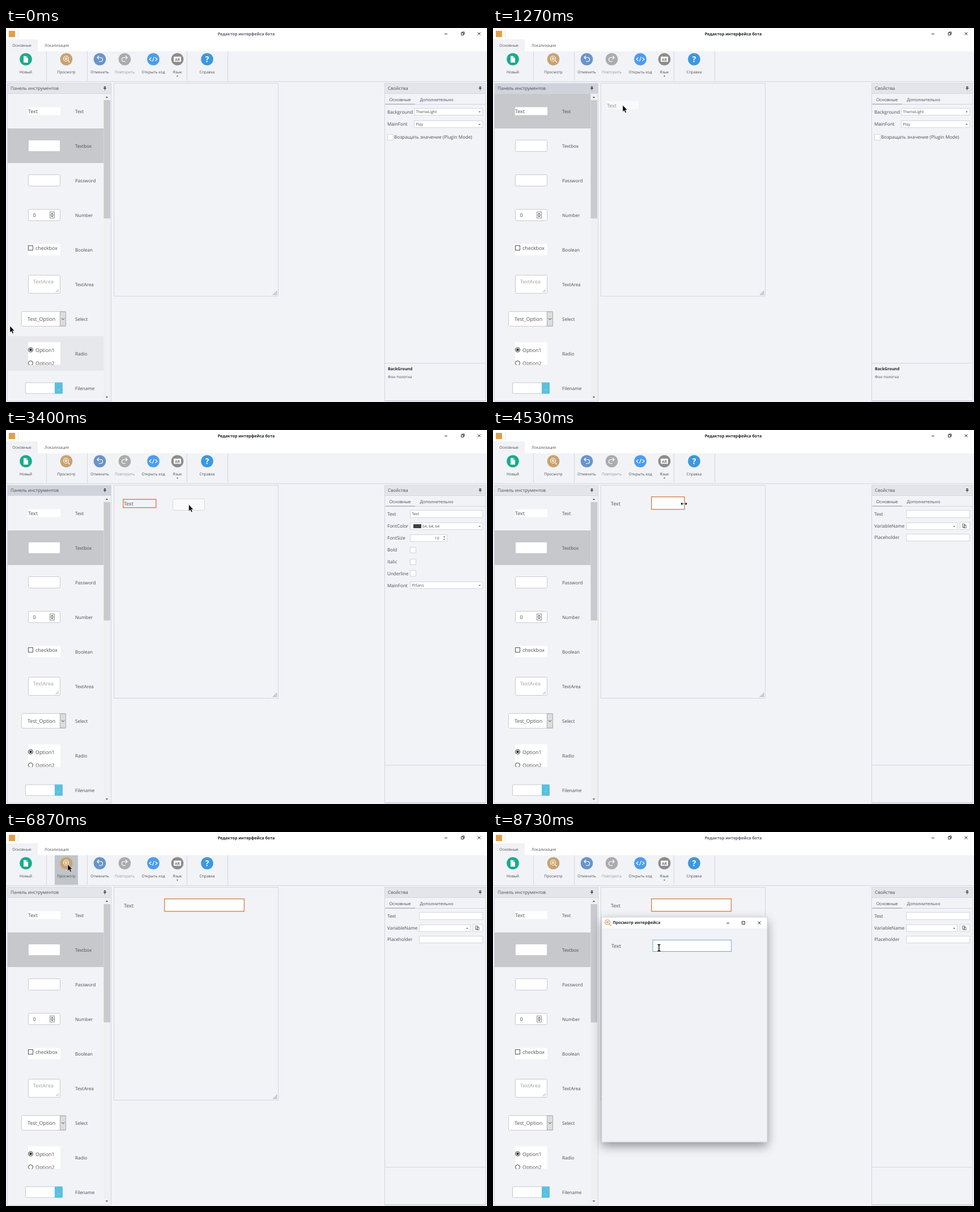
Recreate the animation shown at these times as an HTML page. Size 849 px wide and 659 px high, loop 9140 ms.

```html
<!DOCTYPE html>
<html lang="ru">
<head>
<meta charset="utf-8">
<title>Редактор интерфейса бота</title>
<style>
html, body { margin: 0; width: 100%; height: 100%; overflow: hidden; background: #f1f3f7; }
svg { display: block; width: 849px; height: 659px; }
text { font: 8.1px "Open Sans", "Noto Sans", sans-serif; fill: #4a4c52; text-rendering: geometricPrecision; white-space: pre; }
.s { font-size: 6.7px; }
.tab { font-size: 7.6px; }
.p { font-size: 8.9px; fill: #505050; }
.b { font-size: 7.1px; font-weight: 700; fill: #20242c; }
.c { text-anchor: middle; }
.box { fill: #fff; stroke: #d3d6de; }
.prev { fill: #fff; stroke: #c9cacd; }
.line { fill: none; stroke: #d3d6df; }
.ink { fill: none; stroke: #333; }
.w { fill: none; stroke: #fff; stroke-width: 1.2; }
</style>
</head>
<body>
<svg id="stage" viewBox="0 0 849 659"></svg>
<script>
const LOOP = 9140, TICK = 1000 / 15;

// Markup helpers
const rect = (x, y, w, h, a = '') => `<rect x="${x}" y="${y}" width="${w}" height="${h}" ${a}/>`;
const text = (x, y, s, c = '', a = '') => `<text x="${x}" y="${y}" class="${c}" ${a}>${s}</text>`;
const path = (d, a = 'class="ink"') => `<path d="${d}" ${a}/>`;
const group = (id, body, a = '') => `<g id="${id}" ${a}>${body}</g>`;
const box = (x, y, w, h, c = 'box') => rect(x + .5, y + .5, w - 1, h - 1, `class="${c}"`);
const tri = (x, y, r, up) => path(`M${x - r} ${y}h${2 * r}l${-r} ${up ? -r : r}z`, 'fill="#444"');
const combo = (x, y, w, s = '') => box(x, y, w, 13) + text(x + 3.5, y + 9, s, 's') + tri(x + w - 6, y + 6, 1.8);
const check = y => box(713, y, 11, 11);
const labels = list => list.map(([y, s]) => text(673, y, s)).join('');
const pin = x => path(`M${x - 1.5} 103.5h3M${x - 1} 103.5v3M${x + 1} 103.5v3M${x - 2.5} 106.5h5M${x} 106.5v3`);
const lens = (x, y, k) => `<g transform="translate(${x} ${y}) scale(${k})">` +
  '<circle cx="-.5" cy="-.5" r="4.5"/><circle cx="-.5" cy="-.5" r="1.6"/><path d="M2.8 2.8L6 6"/></g>';
const grip = (x, y) => {
  let d = '';
  for (let i = 0; i < 4; i++)
    for (let j = 0; j <= i; j++) d += `M${x - 2 * j} ${y - 6 + 2 * i}h1.2v1.2h-1.2z`;
  return path(d, 'fill="#8b8e94"');
};

const tools = [
  { x: 35, name: 'Новый', color: '#1aab8b', hit: [14, 56], icon: path('M31 49.500h5l3 3v8.500h-8z', 'fill="#fff"') + path('M36 49.500v3h3', 'fill="none" stroke="#1aab8b" stroke-width=".8"') },
  { x: 106.500, name: 'Просмотр', color: '#c8a370', hit: [86, 127], icon: `<g class="w">${lens(106.5, 54.5, 1)}</g>` },
  { x: 165.500, name: 'Отменить', color: '#6994ca', hit: [145, 186], icon: path('M164 49l-3 3 3 3M161 52h6a3.500 3.500 0 0 1 0 7h-3', 'class="w"') },
  { x: 209.500, name: 'Повторить', color: '#acacac', icon: path('M211 49l3 3-3 3M214 52h-6a3.500 3.500 0 0 0 0 7h3', 'class="w"') },
  { x: 260, name: 'Открыть код', color: '#4a9cf0', hit: [233, 287], icon: path('M256.500 52l-3.500 3 3.500 3M263.500 52l3.500 3-3.500 3M261.500 51l-3 8', 'class="w"') },
  { x: 302.500, name: 'Язык', color: '#8f8b8b', hit: [288, 318], icon: rect(296, 50.5, 13, 9, 'rx="1" fill="#fff"') + text(302.5, 57.5, 'AЯ', 'c', 'style="font-size:6.5px;font-weight:600"') },
  { x: 355, name: 'Справка', color: '#3c98de', hit: [334, 376], icon: text(355, 60, '?', 'c', 'style="font-size:14px;font-weight:700;fill:#fff"') }
];

const rowY = i => 116 + 61 * i;
const field = y => rect(39.5, y - 10, 56, 20, 'rx="2" class="prev"');
const rows = [
  ['Text', y => rect(39, y - 7, 57, 14, 'fill="#fff"') + text(39, y + 3.5, 'Text', 'p')],
  ['Textbox', field],
  ['Password', field],
  ['Number', y => field(y) + text(47.5, y + 3.5, '0', 'p') + rect(77.5, y - 5.5, 8, 11, 'fill="#eee" stroke="#999"') +
    path(`M77.500 ${y}h8`, 'stroke="#999"') + tri(81.5, y - 1.5, 2, true) + tri(81.5, y + 1.5, 2)],
  ['Boolean', y => rect(39, y - 10, 57, 20, 'fill="#fff"') + rect(39.5, y - 7, 8, 8, 'fill="#fff" stroke="#555"') + text(52, y, 'checkbox', 'p')],
  ['TextArea', y => rect(39.5, y - 16, 56, 32, 'rx="2" class="prev"') + text(48, y - 2, 'TextArea', 'p', 'style="fill:#a0a0a0"') +
    path(`M88 ${y + 14}l5-5M91 ${y + 14}l2-2`, 'stroke="#999"')],
  ['Select', y => rect(27.5, y - 13, 78, 26, 'rx="2" class="prev"') + `<svg x="38" y="${y - 12}" width="50" height="24">${text(0, 15.5, 'Test_Option', 'p')}</svg>` +
    rect(95.5, y - 12.5, 10, 25, 'fill="#ddd" stroke="#aaa"') + path(`M98 ${y - 1}l2.500 2.500 2.500-2.500`)],
  ['Radio', y => `<svg x="39" y="${y - 20}" width="57" height="40">` + rect(0, 0, 57, 40, 'fill="#fff"') +
    '<circle cx="4.500" cy="13.500" r="4" class="ink"/><circle cx="4.500" cy="13.500" r="2.200" fill="#222"/><circle cx="4.500" cy="37" r="4" class="ink"/>' +
    text(13, 17, 'Option1', 'p') + text(13, 40, 'Option2', 'p') + '</svg>'],
  ['Filename', y => rect(34.5, y - 9.5, 53, 19, 'rx="1" class="prev"') + rect(86, y - 10, 14, 20, 'rx="1" fill="#5bc0de"') + text(93, y + 3, '..', 'c', 'style="fill:#fff"')]
];

const frame = rect(0, 0, 849, 659, 'fill="#f1f3f7"') + rect(0, 0, 849, 41, 'fill="#fff"') + rect(0, 20, 56, 21, 'fill="#f1f2f6"') +
  rect(5, 5, 11, 11, 'fill="#e0a04c"') + path('M21.500 3v15', 'stroke="#ece5da"') +
  text(424, 12.5, 'Редактор интерфейса бота', 'b c', 'id="title"') +
  path('M774 10.500h5M803.500 8.500h4v4h-4zM805 8.500v-1.500h4v4h-1.500M832.500 7.500l5 5m0-5l-5 5') +
  text(28, 32.5, 'Основные', 's c') + text(89.5, 32.5, 'Локализация', 's c') +
  path('M71.500 41v52M143.500 41v52M319.500 41v52M391.500 41v52M0 94.500h849', 'class="line"');

const ribbon = rect(0, 41, 0, 52, 'id="hot"') + tools.map(t => `<circle cx="${t.x}" cy="55" r="10.800" fill="${t.color}"/>` + t.icon +
  text(t.x, 79.5, t.name, 's c', t.hit ? '' : 'style="fill:#92959b"')).join('') + tri(302.5, 84, 1.7);

const toolbox = box(2, 97, 184, 561, 'line') + rect(3, 98, 182, 17.5, 'id="head"') + path('M3 115.500h182', 'class="line"') +
  text(8, 109, 'Панель инструментов', '', 'style="font-size:7.900px"') + pin(174.5) +
  '<svg width="186" height="656">' + rect(2.5, 0, 170, 61, 'id="hover" fill="#e7e8eb"') + rect(2.5, 0, 170, 61, 'id="picked" fill="#c7c8cc"') +
  rows.map(([name, draw], i) => draw(rowY(i) + 30.5) + text(122, rowY(i) + 33.5, name)).join('') + '</svg>' +
  rect(172.5, 116, 12, 540, 'fill="#f0f0f2"') + rect(172.5, 127, 11.5, 208.5, 'fill="#c9cacd"') + tri(178, 123, 2.3, true) + tri(178, 649.5, 2.3);

const canvas = box(190, 97, 291, 376, 'line') + grip(477, 469) +
  group('label', rect(206.75, 122.25, 58, 14.5, 'id="ring" fill="none" stroke="#ee7a58" stroke-width="1.500"') + text(208, 132.5, 'Text', 'p')) +
  rect(279.75, 117.75, 58, 22, 'id="input" fill="#fff" stroke="#dc8a58" stroke-width="1.500"');

const props = box(668, 97, 179, 561, 'line') + rect(669, 98, 177, 17.5, 'fill="#e4e5ea"') + text(674, 109, 'Свойства', '', 'style="font-size:7.900px"') + pin(837) +
  path('M669 115.500h177M669 134.500h177', 'class="line"') + path('M670 134.200h52', 'stroke="#aeb1bb" stroke-width="1.500"') +
  text(695.5, 129, 'Основные', 'tab c') + text(760, 129, 'Дополнительно', 'tab c') + box(668, 590, 179, 67, 'line') +
  group('panel0', labels([[151, 'Background'], [172, 'MainFont']]) + combo(720, 141, 122, 'ThemeLight') + combo(720, 163, 122, 'Play') +
    box(673, 187, 11, 11) + text(685, 195.3, 'Возращать значение (Plugin Mode)') + text(674, 603, 'BackGround', 'b') + text(674, 616.5, 'Фон полотна', 's')) +
  group('panel1', labels([[151, 'Text'], [172, 'FontColor'], [193, 'FontSize'], [214, 'Bold'], [235, 'Italic'], [255.5, 'Underline'], [276.5, 'MainFont']]) +
    box(713, 141, 129, 14) + text(716.5, 150.2, 'Text', 's') + combo(713, 163, 129) + rect(719, 166, 14, 7, 'fill="#404040"') + text(735, 172, '64; 64; 64', 's') +
    box(713, 184, 66, 13) + text(764.5, 193, '10', 's', 'text-anchor="end"') + tri(773.5, 189, 1.8, true) + tri(773.5, 192, 1.8) +
    check(206) + check(227) + check(247) + combo(713, 267, 129, 'PtSans')) +
  group('panel2', labels([[151, 'Text'], [172, 'VariableName'], [192, 'Placeholder']]) + box(729, 141, 113, 14) + combo(729, 163, 91) +
    box(824, 162, 18, 14) + path('M828.500 165.500h4v6h-4zM831 167.500h4v5h-4z', 'fill="#fff" stroke="#555" stroke-width=".8"') + box(729, 183, 113, 13));

const ghosts = group('ghostText', rect(-28, -7, 56, 14, 'fill="#fff"') + text(-28, 3.5, 'Text', 'p'), 'opacity=".65"') +
  group('ghostBox', rect(-28, -10, 56, 20, 'rx="2" class="prev"'), 'opacity=".65"');

const preview = group('preview', rect(192, 150, 292, 396.5, 'fill="#f1f2f6" style="filter:drop-shadow(0 7px 9px #0006)"') +
  rect(192, 150, 292, 19.5, 'fill="#fff"') + box(191.5, 149.5, 293, 397, 'line') + `<g fill="none" stroke="#c29353" stroke-width="1.200">${lens(202.5, 159.5, .95)}</g>` +
  text(211.5, 162.3, 'Просмотр интерфейса', 'b') + path('M412 160.500h5M439.500 157.500h5v5h-5zM467.500 157.500l5 5m0-5l-5 5') +
  text(209, 204.3, 'Text', 'p') + rect(282, 190.3, 138.7, 20.2, 'id="entry" fill="#fff"') + path('M291 194v12', 'id="caret" stroke="#333"'));

const pointers = group('arrow', path('M0 0V11.500L2.600 9.200 4.500 13.400 6.400 12.500 4.600 8.500H8Z', 'fill="#000" stroke="#fff" stroke-width=".5"')) +
  group('sizer', path('M-6 0l3.200-2.700v2h5.600v-2L6 0 2.800 2.700v-2h-5.600v2z', 'fill="#000" stroke="#fff" stroke-width=".4"') + path('M0-2.500v5', 'stroke="#fff"')) +
  group('beam', path('M-2.500-5.500h2l.5.500.5-.5h2M0-5v10M-2.500 5.500h2l.5-.5.5.5h2', 'fill="none" stroke="#000" stroke-width="1.400"'));

document.getElementById('stage').innerHTML = frame + ribbon + toolbox + canvas + props + preview + ghosts + pointers;

const el = id => document.getElementById(id);
const show = (id, on) => el(id).style.display = on ? '' : 'none';
const set = (id, name, value) => el(id).setAttribute(name, value);

const linear = k => k;
const out = k => k * (2 - k);
const smooth = k => k * k * (3 - 2 * k);

// Pointer path: time, x, y, easing towards the point
const moves = [
  [-67, 12, 560], [0, 7, 525, linear], [600, 67, 144, out],
  [730, 67, 144, linear], [1270, 229, 136, smooth], [1400, 235, 129, out],
  [1600, 235, 129, linear], [2670, 69, 208, smooth],
  [2730, 69, 208, linear], [3270, 326, 132, smooth], [3730, 309, 129, smooth],
  [4070, 309, 129, linear], [4330, 336, 130, smooth], [4530, 337, 130, linear],
  [4800, 337, 130, linear], [5470, 420, 130, smooth], [5730, 416, 136, smooth],
  [6070, 234, 85, linear], [6670, 109, 57, out],
  [7070, 109, 57, linear], [7930, 292, 201, smooth], [8070, 293, 204, linear], [LOOP, 293, 204, linear]
];

function pointer(t) {
  const i = Math.max(1, moves.findIndex(m => m[0] >= t));
  const [t0, x0, y0] = moves[i - 1], [t1, x1, y1, ease] = moves[i];
  const k = ease((t - t0) / (t1 - t0));
  return [x0 + (x1 - x0) * k, y0 + (y1 - y0) * k];
}

function draw(now) {
  // The screen is sampled 15 times a second
  const t = Math.floor((now % LOOP + 4) / TICK) * TICK + 4;
  const during = (a, b) => t >= a && t < b;
  const [x, y] = pointer(Math.min(t - 4, LOOP));
  const [hx, hy] = pointer(t - 4 - TICK);
  const at = `translate(${x} ${y})`;
  const dragText = during(800, 1600), dragBox = during(2800, 4130);
  const opened = t >= 7070;

  set('title', 'style', `fill:${during(800, 7070) ? '#1d2026' : '#5b6272'}`);
  set('head', 'fill', dragText || dragBox ? '#d0d3da' : '#e4e5ea');
  set('picked', 'y', rowY(during(800, 2800) ? 0 : 1));
  set('hover', 'y', rowY(Math.floor((hy - 116) / 61)));
  show('hover', hx < 172 && hy > 116 && t < 4130);

  const pressed = during(6800, 7070);
  const hot = !opened && hy > 41 && hy < 94 && tools.find(b => b.hit && hx >= b.hit[0] && hx < b.hit[1]);
  show('hot', hot);
  if (hot) {
    set('hot', 'x', hot.hit[0]);
    set('hot', 'width', hot.hit[1] - hot.hit[0]);
    set('hot', 'fill', pressed ? '#c1c4c9' : '#e3e5e9');
  }

  show('label', t >= 1600);
  show('ring', during(1600, 4130));
  show('input', t >= 4130);
  set('input', 'width', t < 4800 ? 58 : t < 5470 ? x - 279 : 140.7);
  show('panel0', t < 1600);
  show('panel1', during(1600, 4130));
  show('panel2', t >= 4130);

  show('ghostText', dragText);
  show('ghostBox', dragBox);
  set('ghostText', 'transform', at);
  set('ghostBox', 'transform', at);

  const k = out(Math.min(1, Math.max(0, (t - 7000) / 200)));
  const s = .92 + .08 * k;
  show('preview', opened);
  set('preview', 'opacity', k);
  set('preview', 'transform', `translate(338 348) scale(${s}) translate(-338 -348)`);
  const focus = Math.min(1, Math.max(0, (t - 8200) / 200));
  set('entry', 'stroke', `rgb(${204 - 92 * focus},${206 - 40 * focus},${212 - 4 * focus})`);
  show('caret', during(8270, 8730));

  const sizing = during(4265, 5590);
  const typing = opened && x > 282 && x < 421 && y > 190 && y < 211;
  show('sizer', sizing);
  show('beam', typing);
  show('arrow', !sizing && !typing);
  for (const id of ['sizer', 'beam', 'arrow']) set(id, 'transform', at);
}

const start = performance.now();
(function loop() {
  draw(performance.now() - start);
  requestAnimationFrame(loop);
})();
</script>
</body>
</html>
```
